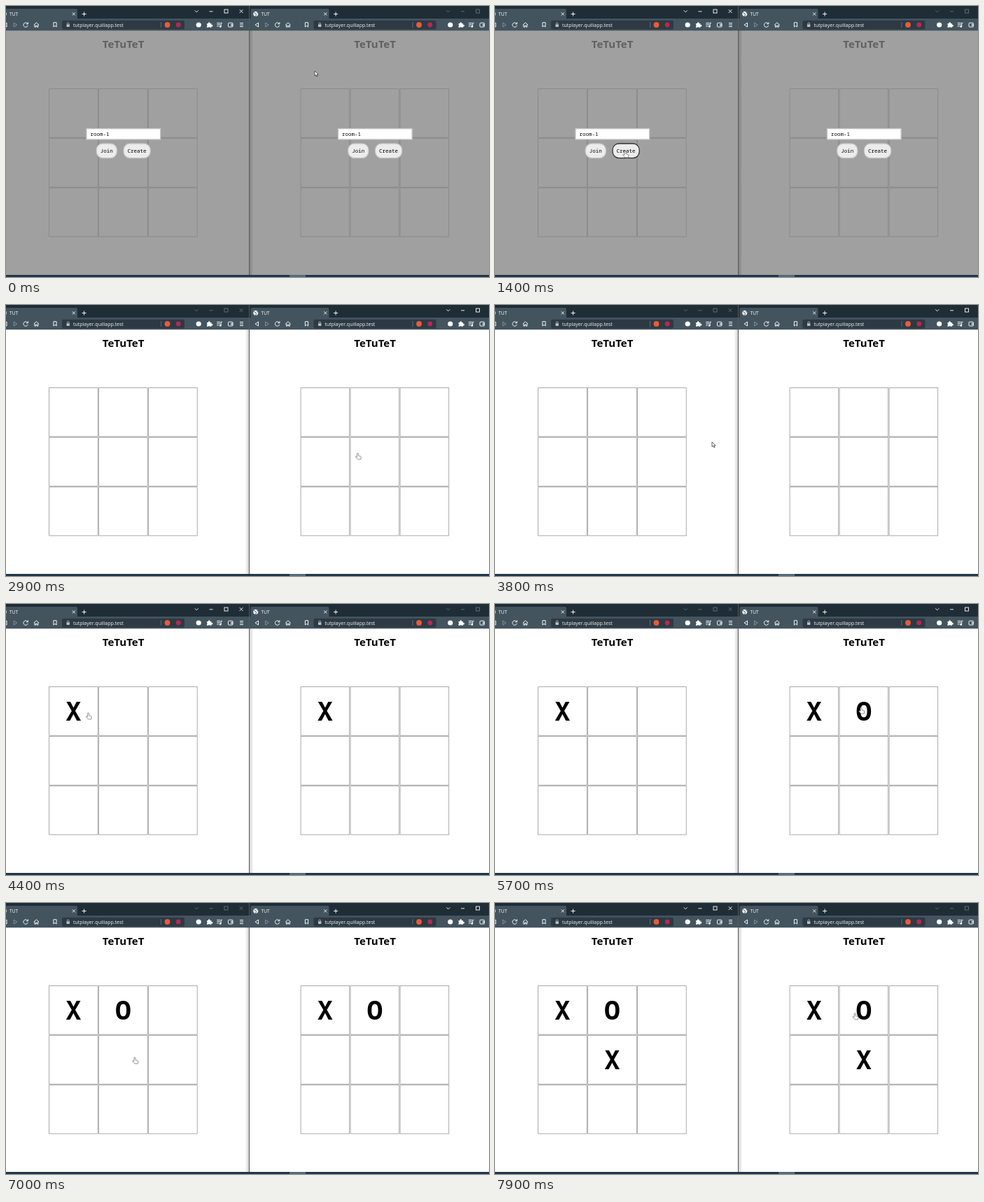
An HTML page that plays this animation: 690x388 px, repeating every 8 s.

```html
<!DOCTYPE html>
<html lang="en">
<head>
<meta charset="utf-8">
<title>Two player grid game</title>
<style>
  html, body { margin: 0; width: 100%; height: 100%; overflow: hidden; background: #fff; }
  svg { display: block; width: 100%; height: 100%; }
  text { font-family: "Open Sans", "Noto Sans", sans-serif; }
  .mono { font-family: "Noto Sans Mono", "DejaVu Sans Mono", monospace; }
  .line { fill: none; stroke: #f2f5f6; stroke-width: 1; }
  .dim { stroke: #84929a; }
  .controls { fill: none; stroke: #64717a; stroke-width: .9; }
  .active .controls { stroke: #fff; }
  .cell { fill: #fff; stroke: #969696; stroke-width: .8; }
  .mark { font-size: 38px; font-weight: 700; text-anchor: middle; }
  .button rect { fill: #ececec; stroke: #c6c6c6; stroke-width: 1.3; }
  .button.hover rect { stroke: #333; }
  .button text { font-size: 7.5px; text-anchor: middle; }
</style>
</head>
<body>
<svg id="stage" viewBox="0 0 690 388"></svg>
<script>
const SPLIT = 347.5, OFFSET = 359.5, LOOP = 8000;
const GRID = { x: 61.6, y: 118.6, pitch: 71, size: 69.6 };
const BUTTONS = [
  { label: 'Join', x: 129.2, width: 29.2 },
  { label: 'Create', x: 168, width: 38.2 }
];
const BUTTON_Y = 197, BUTTON_HEIGHT = 20.6, LOBBY_SHIFT = -9.5;

// Marks appear first in the player's own window, then in the other one.
const MARKS = [
  { text: 'X', column: 0, row: 0, times: [4300, 4400] },
  { text: 'O', column: 1, row: 0, times: [5900, 5700] },
  { text: 'X', column: 1, row: 1, times: [7100, 7200] }
];
const FOCUS = [[0, 0], [2800, 1], [4300, 0], [5700, 1], [7100, 0]];
// Pointer strokes: start, end, destination and downward sag.
const MOVES = [
  { from: 600, to: 1400, x: 186, y: 208, sag: 0 },
  { from: 2000, to: 2700, x: 502.5, y: 212, sag: 0 },
  { from: 3400, to: 4200, x: 117.5, y: 156, sag: 12 },
  { from: 4700, to: 5500, x: 523, y: 148, sag: 9 },
  { from: 6000, to: 6900, x: 184, y: 221, sag: 8 },
  { from: 7200, to: 8000, x: 529, y: 155, sag: 0 }
];
const START = { x: 441, y: 93 };

const cells = () => Array.from({ length: 9 }, (_, i) =>
  `<rect class="cell" x="${GRID.x + i % 3 * GRID.pitch}" y="${GRID.y + Math.floor(i / 3) * GRID.pitch}"
    width="${GRID.size}" height="${GRID.size}"/>`).join('');

const marks = () => MARKS.map(m =>
  `<text class="mono mark" x="${96.4 + m.column * GRID.pitch}" y="${167 + m.row * GRID.pitch}">${m.text}</text>`).join('');

const buttons = () => BUTTONS.map(b =>
  `<g class="button"><rect x="${b.x}" y="${BUTTON_Y}" width="${b.width}" height="${BUTTON_HEIGHT}" rx="9"/>
    <text class="mono" x="${b.x + b.width / 2}" y="210">${b.label}</text></g>`).join('');

const chrome = () => `
  <rect x="-12" width="372" height="19" fill="#1f2d36"/>
  <path d="M-12 35.2V18h2V6q0-2 2-2H100q2 0 2 2V18H360V35.2z" fill="#43545e"/>
  <circle cx="-2.7" cy="11.3" r="3.5" fill="#f2f5f6"/>
  <path d="M-5 9.5l2 1 1 2-1 2M-1 8.5l1 2" stroke="#43545e" fill="none"/>
  <text x="5" y="13.6" font-size="6.6" fill="#fff">TUT</text>
  <path class="line" d="M94.8 9.4l4 4m0-4l-4 4M108.6 11.5h6m-3-3v6"/>
  <g class="controls">
    <path d="M269.7 6.3l2.5 2.5 2.5-2.5M290.5 7.8h5M333.6 5l5 5m0-5l-5 5"/>
    <rect x="312" y="5" width="5" height="5"/>
  </g>
  <path class="line" d="M1 24l-4.5 3 4.5 3z"/>
  <path class="line dim" d="M11.2 24l4.5 3-4.5 3z"/>
  <path class="line" d="M30.8 25.3a3.2 3.2 0 1 0 .4 2.6M31.4 23.3v2.5h-2.5M39.8 27l3.6-3.2 3.6 3.2M40.9 26.5v3.6h1.7v-2h1.6v2h1.7v-3.6M67.9 23.7h4.2v6.3l-2.1-1.7-2.1 1.7z"/>
  <rect x="80" y="20.7" width="175" height="12.8" rx="2" fill="#2d3a43"/>
  <rect x="86.5" y="26.3" width="4.4" height="3.6" fill="#b9c3c8"/>
  <path d="M87.4 26.5v-1.3a1.3 1.3 0 0 1 2.6 0v1.3" fill="none" stroke="#b9c3c8" stroke-width=".8"/>
  <text x="96" y="29.5" font-size="7" fill="#f2f5f6">tutplayer.quillapp.test</text>
  <path d="M221.5 23v8" stroke="#687780" stroke-width=".8"/>
  <circle cx="230.5" cy="27" r="3.9" fill="#f0583a"/>
  <circle cx="246.2" cy="27" r="3.4" fill="#b82852"/>
  <circle cx="275.2" cy="27" r="3.6" fill="#fff"/>
  <path d="M287 25h2a1.3 1.3 0 1 1 2.4 0h2v2a1.3 1.3 0 1 1 0 2.2v1.5h-2.1a1.2 1.2 0 0 0-2.2 0H287v-2a1.2 1.2 0 0 0 0-2z" fill="#fff"/>
  <path class="line" d="M301.3 24.4h5M301.3 26.7h5M301.3 29h2.8M307.2 29.5v-5.2h1.8"/>
  <circle cx="306.2" cy="29.4" r="1.3" fill="#fff"/>
  <rect class="line" x="317.5" y="24.2" width="6.4" height="5.8" rx="1"/>
  <path class="line" d="M324.5 26.2h-2.7v2h2.7M334 24.5h5M334 27h5M334 29.5h5"/>`;

const windowMarkup = index => `
  <g clip-path="url(#clip${index})"><g class="window" transform="translate(${index * OFFSET})">
    <rect x="-12" width="372" height="388" fill="#fff"/>
    <text x="167.6" y="60.4" font-size="15" font-weight="700" text-anchor="middle">TeTuTeT</text>
    ${cells()}${marks()}
    <g class="lobby">
      <rect x="-12" y="35" width="372" height="351" fill="#808080" fill-opacity=".75"/>
      <g class="form">
        <rect x="115" y="175.6" width="105.6" height="15.4" fill="#fff" stroke="#c4c4c4" stroke-width="1.3"/>
        <text class="mono" x="120.5" y="186" font-size="7.5">room-1</text>
        ${buttons()}
      </g>
      <text class="mono waiting" x="167" y="239.5" font-size="14.5" text-anchor="middle" fill="#fff">Waiting for player. . .</text>
    </g>
    ${chrome()}
  </g></g>`;

const stage = document.getElementById('stage');
stage.innerHTML = `
  <defs>
    <clipPath id="clip0"><rect width="${SPLIT}" height="388"/></clipPath>
    <clipPath id="clip1"><rect x="${SPLIT}" width="343" height="388"/></clipPath>
    <linearGradient id="shade"><stop stop-opacity="0"/><stop offset="1" stop-opacity=".2"/></linearGradient>
  </defs>
  ${windowMarkup(0)}${windowMarkup(1)}
  <rect id="shadow" x="-6" y="35" width="6" height="350" fill="url(#shade)"/>
  <path d="M347.5 0V385" stroke="#55595c"/>
  <rect y="385" width="690" height="3" fill="#22364a"/>
  <rect x="405" y="385" width="23" height="3" fill="#566b79"/>
  <g id="pointer" fill="#fff" stroke-width=".7" stroke-linejoin="round">
    <path stroke="#222" d="M0 0V7l1.7-1.5L2.9 8.2l1.2-.5L3 5.1h2.2z"/>
    <path stroke="#666" d="M-1 1a1 1 0 0 1 2 0V3.8l2.9.7q1 .3.9 1.4L4.2 9H0L-3 5.7q-.2-1.3.9-.9l1.1.7z"/>
  </g>`;

const windows = [...stage.querySelectorAll('.window')].map(root => ({
  root,
  lobby: root.querySelector('.lobby'),
  form: root.querySelector('.form'),
  waiting: root.querySelector('.waiting'),
  marks: [...root.querySelectorAll('.mark')],
  buttons: [...root.querySelectorAll('.button')]
}));
const pointer = document.getElementById('pointer');
const [arrow, hand] = pointer.children;
const shadow = document.getElementById('shadow');

const show = (element, visible) => element.setAttribute('visibility', visible ? 'inherit' : 'hidden');
const within = (value, start, size) => value >= start && value <= start + size;

function pointerAt(t) {
  let { x, y } = START;
  for (const move of MOVES) {
    const p = Math.min(1, Math.max(0, (t - move.from) / (move.to - move.from)));
    const eased = p * p * (3 - 2 * p);
    x += (move.x - x) * eased;
    y += (move.y - y) * eased + move.sag * Math.sin(Math.PI * eased);
  }
  return { x, y };
}

function draw(t) {
  const inLobby = t < 2900;
  const focused = FOCUS.filter(([time]) => t >= time).pop()[1];
  const { x, y } = pointerAt(t);
  const under = x < SPLIT ? 0 : 1;
  const localX = x - under * OFFSET;
  let clickable = !inLobby && within(localX, GRID.x, 212) && within(y, GRID.y, 212);

  windows.forEach((win, index) => {
    const waiting = index === 0 && t >= 1800;
    const shift = waiting ? LOBBY_SHIFT : 0;
    win.root.classList.toggle('active', focused === index);
    show(win.lobby, inLobby);
    show(win.waiting, inLobby && waiting);
    win.form.setAttribute('transform', `translate(0 ${shift})`);
    win.marks.forEach((mark, i) => show(mark, t >= MARKS[i].times[index]));
    win.buttons.forEach((button, i) => {
      const { x: left, width } = BUTTONS[i];
      const hover = inLobby && under === index && within(localX, left, width)
        && within(y, BUTTON_Y + shift, BUTTON_HEIGHT);
      button.classList.toggle('hover', hover);
      clickable ||= hover;
    });
  });

  // The focused window casts its shadow on the other one.
  shadow.setAttribute('transform', `translate(${SPLIT}) scale(${focused ? 1 : -1} 1)`);
  show(arrow, !clickable);
  show(hand, clickable);
  pointer.setAttribute('transform', `translate(${x} ${y})`);
}

const began = performance.now();
function tick() {
  const elapsed = (performance.now() - began) % LOOP;
  draw(Math.floor(elapsed / 100) * 100);
  requestAnimationFrame(tick);
}
tick();
</script>
</body>
</html>
```
